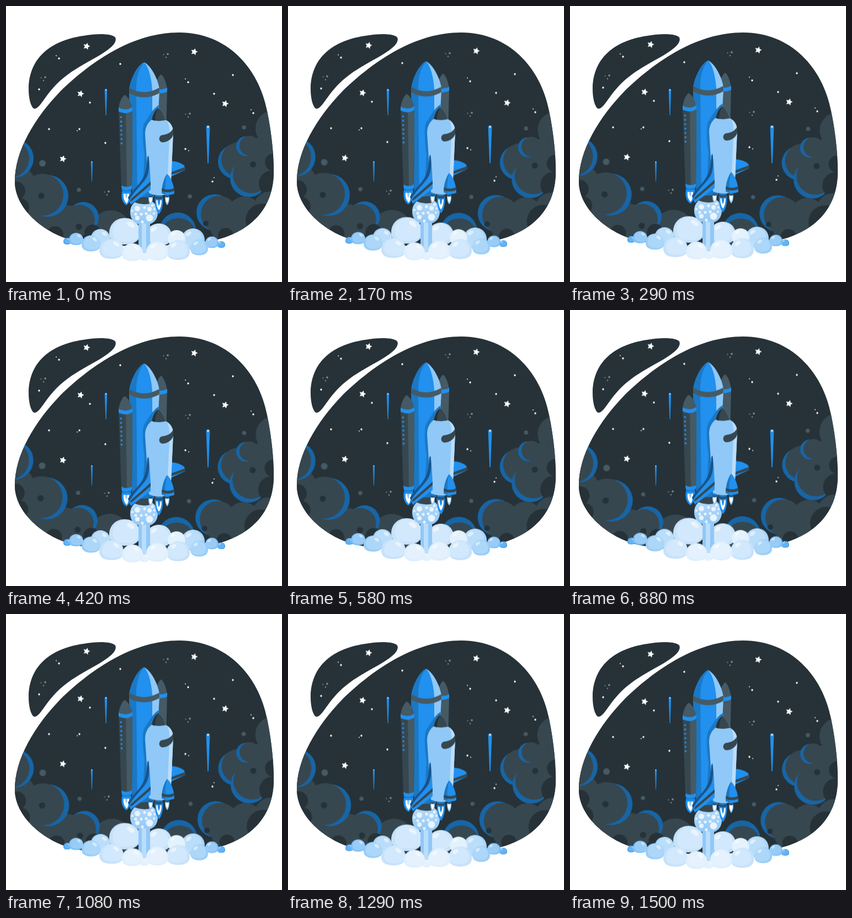
An HTML page that plays this animation: 500 by 500 pixels, repeating every 1540 ms.

```html
<!DOCTYPE html>
<html lang="en">
<head>
<meta charset="utf-8">
<title>Rocket launch</title>
<style>
  html, body { margin: 0; width: 100%; height: 100%; overflow: hidden; background: #fff; }
  svg { display: block; width: 100vw; height: 100vh; }
  .lift { animation: lift 770ms cubic-bezier(.33, .2, .67, 1) infinite alternate; }
  .sway { transform-origin: 250px 250px; animation: sway 770ms cubic-bezier(.37, 0, .63, 1) -385ms infinite alternate; }
  @keyframes lift { to { transform: translateY(-7.8px); } }
  @keyframes sway { from { transform: rotate(-.9deg); } to { transform: rotate(.9deg); } }
  .night { fill: #263238; }
  .slate { fill: #37474f; }
  .steel { fill: #455a64; }
  .blue { fill: #2190ee; }
  .deep { fill: #1b78c4; }
  .rim { fill: #1765a6; }
  .sky { fill: #90c8f7; }
  .pale { fill: #b9ddfb; }
  .white { fill: #fff; }
</style>
</head>
<body>
<svg viewBox="0 0 500 500">
  <defs>
    <path id="hill" d="M314 48C400 48 458 112 473 190C480 225 485 262 485 300C485 370 440 408 383 423C320 437 180 440 118 424C66 409 16 366 16 318C16 262 52 203 98 155C158 97 232 48 314 48Z"/>
    <path id="dome" d="M-1 .15C-1 -.55 -.55 -1 0 -1S1 -.55 1 .15C1 .78 .55 1 0 1S-1 .78 -1 .15Z"/>
    <clipPath id="frame"><use href="#hill"/></clipPath>
    <clipPath id="tank"><path d="M250 102C239 106 225 132 223 152L229 345Q248 358 268 345L278 152C276 132 261 106 250 102Z"/></clipPath>
    <clipPath id="ship"><path d="M276 185C270 188 266 197 264 206C257 211 252 220 252 232L259 339Q278 347 298 339L303 228C303 218 297 210 289 206C287 198 282 188 276 185Z"/></clipPath>
    <linearGradient id="plume" x1="0" y1="0" x2="0" y2="1">
      <stop offset=".1" stop-color="#b0d7f9"/><stop offset=".5" stop-color="#90c8f7"/>
    </linearGradient>
  </defs>

  <use href="#hill" class="night"/>
  <path class="night" d="M198 57C194 50 165 49 140 54C98 60 42 82 41 150C41 170 46 184 51 186C60 187 68 168 84 150C110 120 138 108 170 89C190 77 202 66 198 57Z"/>

  <g id="stars" class="lift"></g>
  <g id="streaks"></g>
  <g clip-path="url(#frame)"><g id="clouds" class="sway"></g></g>

  <g class="lift">
    <g id="puffsBack"></g>

    <!-- exhaust -->
    <path fill="url(#plume)" d="M240 395C230 392 225 384 225 374C225 360 235 350 250 350S275 360 275 374C275 384 270 392 261 395V448H240Z"/>
    <path class="pale" d="M246 394H254V448H246Z"/>
    <g id="foam" fill="#e9f4fe"></g>

    <g id="puffsFront"></g>

    <!-- right booster -->
    <path class="steel" d="M281 124C276 127 270 140 270 153V230H290L292 152C291 140 286 127 281 124Z"/>
    <path class="blue" d="M272 150Q283 153 292 148V155Q283 160 272 157Z"/>

    <!-- tank -->
    <g clip-path="url(#tank)">
      <path class="blue" d="M215 95H285V360H215Z"/>
      <path class="deep" d="M250 102C239 115 235 135 236 160L238 360H215V95Z"/>
      <path class="sky" d="M250 102C258 108 264 132 265 152V360H285V95Z"/>
      <path class="deep" d="M276 180C264 188 258 202 250 213C246 225 248 250 251 270L246 360H285V186Z"/>
      <path class="steel" d="M220 146Q250 166 281 146V156Q250 175 220 156Z"/>
    </g>
    <path class="slate" d="M232 344Q249 349 266 344L264 357Q249 362 234 356Z"/>

    <!-- left booster -->
    <path class="deep" d="M209 325L211 342Q218 345 226 342L228 325Z"/>
    <path class="blue" d="M210 336C208 347 211 357 218 361C224 357 227 348 226 336Z"/>
    <path class="white" d="M213 340C212 348 215 355 219 358C222 353 223 346 223 340Z"/>
    <path class="sky" d="M216 340Q216 346 218 349Q220 345 220 340Z"/>
    <path class="slate" d="M204 188H229V240L228 328Q218 332 209 327Z"/>
    <path class="steel" d="M217 190H229V240L228 328L219 330Z"/>
    <path class="steel" d="M215 161C210 164 204 176 204 188Q217 194 229 187C228 176 221 164 215 161Z"/>
    <path class="blue" d="M204 184Q217 191 229 183V190Q217 198 204 191Z"/>
    <path class="blue" d="M209 325Q218 330 228 325V331Q218 337 210 332Z"/>
    <g id="ports" class="blue"></g>

    <!-- right wing -->
    <path class="blue" d="M299 281Q313 281 323 289L325 297L299 309Z"/>
    <path class="slate" d="M299 301L324 292L325 297L299 306Z"/>

    <g id="engines"></g>

    <!-- shuttle body -->
    <g clip-path="url(#ship)">
      <path class="sky" d="M245 180H310V350H245Z"/>
      <path class="pale" d="M289 203C296 212 297 225 296 240L291 350H310V200Z"/>
      <path class="slate" d="M258 180H294V205Q278 212 258 204Z"/>
      <path class="night" d="M276 185Q270 195 270 208L258 204V185Z"/>
    </g>
    <path class="slate" d="M303 221C299 231 289 233 282 234C276 236 276 246 283 247C292 247 301 241 303 233Z"/>

    <!-- left wing -->
    <path class="blue" d="M258 271C260 280 261 300 262 321V333L226 360L221 347L231 333C253 312 257 296 258 271Z"/>
    <path fill="#1a5288" d="M258 271C260 284 260 299 255 310C246 325 232 335 223 352L221 347L231 333C253 312 255 296 256 274Z"/>
    <path class="slate" d="M262 318V324L228 353L224 354L227 349Z"/>

    <!-- tail fin -->
    <path class="blue" d="M292 304C286 312 282 326 282 339Q293 345 305 340C305 326 299 310 292 304Z"/>
    <path class="deep" d="M292 304C286 312 282 326 282 339L289 342Q287 322 292 304Z"/>
    <path class="slate" d="M283 330Q293 335 304 330L305 335Q293 340 282 335Z"/>
  </g>
</svg>
<script>
  const put = (id, html) => document.getElementById(id).innerHTML += html;
  const dot = (x, y, r, cls = "") => `<circle cx="${x}" cy="${y}" r="${r}" class="${cls}"/>`;
  const dots = (list, r, cls) => list.map(([x, y]) => dot(x, y, r, cls)).join("");

  // Sky
  const star = (x, y) => {
    const pts = Array.from({ length: 10 }, (_, i) => {
      const a = i * Math.PI / 5 - 1.3, r = i % 2 ? 2.9 : 6;
      return [x + r * Math.cos(a), y + r * Math.sin(a)].map(v => v.toFixed(2)).join();
    });
    return `<polygon points="${pts.join(" ")}" fill="#fff" stroke="#fff" stroke-width=".6" stroke-linejoin="round"/>`;
  };
  const trio = (x, y) => `<g fill="#fff" opacity=".45">${dot(x, y, 1.8)}${dot(x - 7.5, y + 1, 1)}${dot(x - 3, y + 6, 1.2)}</g>`;
  put("stars",
    [[146, 73], [341, 83], [135, 159], [397, 177], [103, 277]].map(p => star(...p)).join("") +
    dots([[96, 95], [207, 105], [330, 138], [411, 125], [377, 159], [60, 151], [152, 175], [78, 223],
      [133, 223], [180, 248], [448, 194], [325, 259], [374, 318]], 1.7, "white") +
    dots([[91, 90], [325, 132], [129, 226], [444, 188], [331, 262], [377, 311]], .9, "white") +
    [[71, 129], [293, 87], [333, 195], [186, 336]].map(p => trio(...p)).join(""));

  const streak = (x, y, w, h) =>
    `<path class="blue" d="M${x - w} ${y + w}Q${x - w} ${y} ${x} ${y}T${x + w} ${y + w}L${x + w / 4} ${y + h}H${x - w / 4}Z"/>` +
    dot(x, y + w * .9, w * .45, "white");
  put("streaks", streak(181, 150, 2.2, 48) + streak(366, 216, 3.4, 69) + streak(155.5, 281, 1.6, 37));

  // Dark clouds
  const lit = (x, y, r, dx, dy) => dot(x, y, r, "rim") + dot(x + dx, y + dy, r, "slate");
  put("clouds",
    dots([[22, 320], [40, 345], [62, 378]], 30, "slate") +
    dots([[108, 396], [190, 406], [75, 405]], 36, "slate") +
    lit(15, 276, 35, -8, 0) +
    lit(75, 344, 38, -9, -2) +
    lit(140, 383, 28, -7, 5) +
    dots([[18, 335], [25, 365]], 17, "night") + dots([[89, 414], [157, 411]], 15, "night") +
    dots([[64, 344], [132, 400]], 5.7, "night") +
    dots([[485, 222], [470, 268], [474, 305]], 33, "slate") +
    lit(415, 282, 31, 6, -4) + lit(440, 312, 34, 5, -7) + lit(435, 254, 18, 6, -1) +
    dot(485, 283, 16, "night") + dot(482, 322, 24, "night") + dot(447.5, 287, 5.5, "night") +
    dots([[432, 375], [478, 366], [400, 400]], 30, "slate") +
    lit(378, 374, 33, 8, 3) +
    dot(464, 388, 30, "night") + dot(398, 416, 14, "night") +
    lit(311, 407, 33, 1, 10) + dot(362, 394, 5, "night") +
    dot(66, 285, 6, "steel") + dots([[132, 333], [431, 220], [333, 345]], 3.8, "steel"));

  // Bright smoke: shaded rim and a glint; side is where the light falls
  const dome = (x, y, rx, ry, fill, alpha = 1) =>
    `<use href="#dome" transform="translate(${x} ${y}) scale(${rx} ${ry})" fill="${fill}" opacity="${alpha}"/>`;
  const puff = (x, y, rx, ry, fill, side) =>
    dome(x, y, rx, ry, fill) +
    dome(x + side * rx * .1, y - ry * .08, rx * .88, ry * .88, "#fff", .2) +
    `<g transform="translate(${x + side * rx * .4} ${y - ry * .5}) rotate(${side * 35})">` +
    dome(0, 0, rx * .28, ry * .18, "#fff", .5) + "</g>";
  const puffs = list => list.map(p => puff(...p)).join("");
  const [ice, mist, haze, soft, clear, azure] = ["#deeffe", "#c6e2fb", "#a8d4f9", "#98cdf8", "#7fc0f6", "#42a0ee"];
  put("puffsBack", puffs([
    [171, 421, 18, 17, haze, 1], [215, 408, 28, 24, mist, 1],
    [277, 414, 23, 20, mist, -1], [339, 422, 21, 19, haze, -1], [309, 420, 16, 14, ice, -1]
  ]));
  put("puffsFront", puffs([
    [111, 426, 7, 6, azure, 1], [127, 422, 13, 11, clear, 1], [154, 430, 17, 14.5, soft, 1],
    [390, 432, 7, 6, azure, -1], [373, 428, 12, 10.5, clear, -1], [350, 437, 16, 14.5, soft, -1],
    [191, 440, 22, 18, mist, 1], [312, 442, 21, 18, mist, -1],
    [229, 446, 19, 16, ice, 1], [274, 444, 20, 17, ice, -1], [251, 455, 8, 6.5, ice, 1]
  ]));
  put("foam",
    dot(260, 384, 6.5) + dot(238, 367, 5) + dots([[260, 368], [238, 384]], 4) +
    dots([[247, 391], [265, 361], [251, 365], [235, 377], [245, 377], [254, 376]], 2.6) +
    dots([[229, 371], [268, 376], [269, 368]], 1.9));

  put("ports", Array.from({ length: 7 }, (_, i) => dot(208.3 + i * .2, 201.5 + i * 7.9, 1.8)).join(""));

  const flame = (w, h, cls) =>
    `<path class="${cls}" d="M${-w} 0C${-w - 1} ${h * .45} ${-w * .6} ${h * .85} 0 ${h}C${w * .6} ${h * .85} ${w + 1} ${h * .45} ${w} 0Z"/>`;
  const engine = (x, y, s, glow, core) =>
    `<g transform="translate(${x} ${y}) scale(${s})">` +
    flame(7, 27, glow) + flame(4.5, 20, "white") + flame(2, 12, core) +
    `<path class="deep" d="M-6 -12H6L8 0Q0 4 -8 0Z"/><path class="slate" d="M-7 -5Q0 -2 7 -5V-2Q0 1 -7 -2Z"/></g>`;
  put("engines", engine(262, 346, .55, "sky", "white") + engine(292, 346, .55, "sky", "white") +
    engine(277, 350, 1, "blue", "blue"));
</script>
</body>
</html>
```
